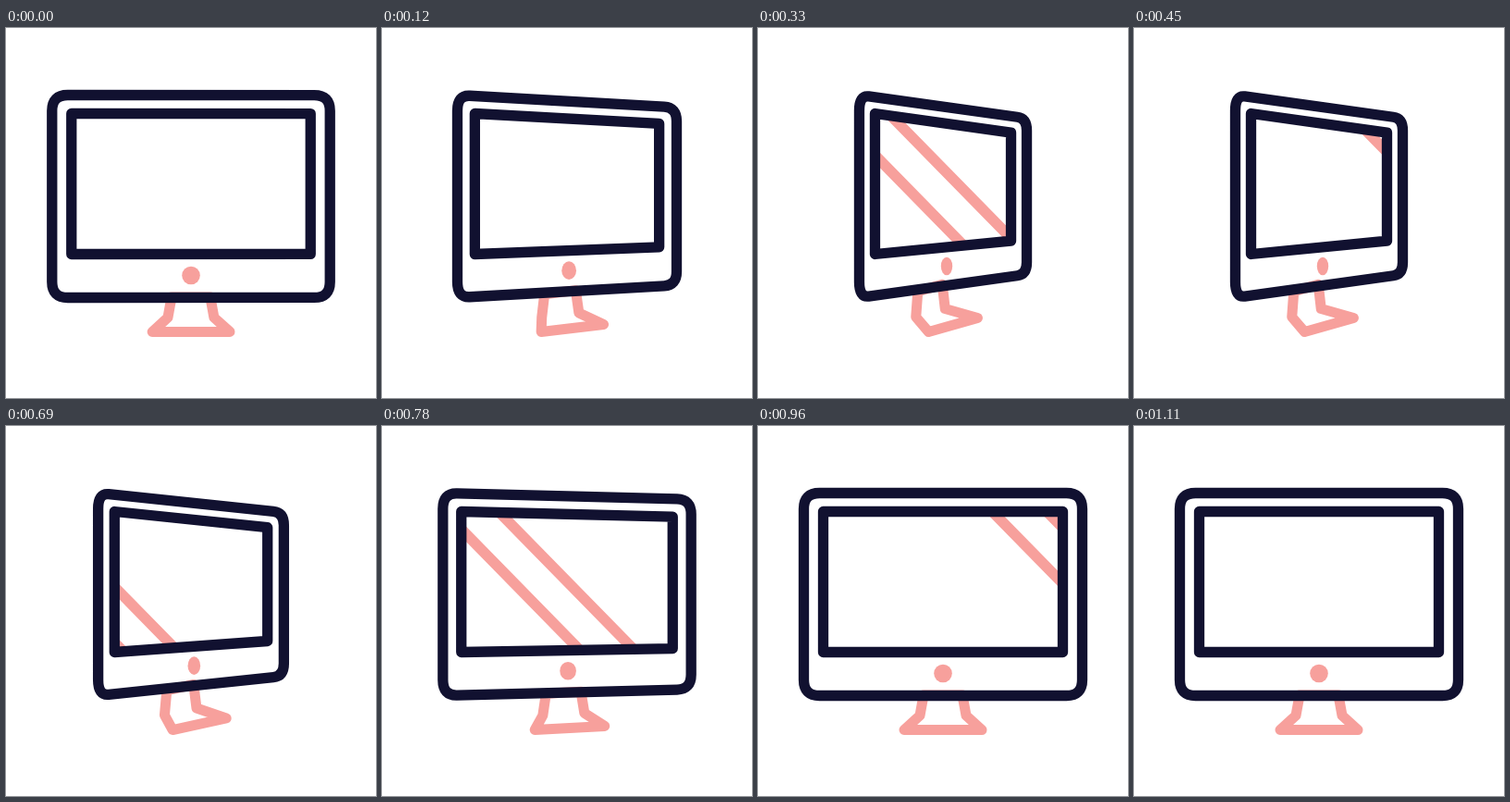
Animation of 400x400 px, one loop 1200 ms. Source, as an HTML page with a canvas:

```html
<!DOCTYPE html>
<html lang="en">
<head>
<meta charset="utf-8">
<title>Turning monitor</title>
<style>
  html, body { margin: 0; width: 100%; height: 100%; overflow: hidden; background: #fff; }
  canvas { display: block; width: 100vw; height: 100vh; }
</style>
</head>
<body>
<canvas id="stage" width="400" height="400"></canvas>
<script>
const ctx = document.getElementById('stage').getContext('2d');
const NAVY = '#111130', PINK = '#f7a09c', LOOP = 1200, CENTER = 200, HORIZON = 182;

const progress = (t, start, length) => Math.min(1, Math.max(0, (t - start) / length));
const smooth = x => x * x * (3 - 2 * x);
const sineOut = x => Math.sin(x * Math.PI / 2);
const cubicInOut = x => x < 0.5 ? 4 * x ** 3 : 1 - 4 * (1 - x) ** 3;

// 0 = facing front, 1 = fully turned
const turnAt = t => sineOut(progress(t, 0, 338)) - cubicInOut(progress(t, 565, 365));

// Offset (x - y) of the trailing glint
const glintAt = t => t < LOOP * 0.45
  ? -236 + 466 * smooth(progress(t, 75, 525))
  : -188 + 418 * smooth(progress(t, 540, 570));

// Rounded box that narrows by `squeeze` per side and shrinks towards its right edge
function box(half, squeeze, top, bottom, radius, s) {
  const path = new Path2D();
  const place = (x, y) => {
    const u = x / half;
    return [CENTER + u * (half - squeeze * s), HORIZON + (y - HORIZON) * (1 - 0.115 * s * (1 + u))];
  };
  for (let i = 0; i < 4; i++) {
    const right = i === 1 || i === 2, low = i > 1;
    const x = right ? half : -half, y = low ? bottom : top;
    const beside = place(x - Math.sign(x) * radius, y);
    const along = place(x, low ? y - radius : y + radius);
    const [from, to] = i % 2 ? [beside, along] : [along, beside];
    path.lineTo(...from);
    path.quadraticCurveTo(...place(x, y), ...to);
  }
  path.closePath();
  return path;
}

// Neck, knee and foot mirrored about the centre; each drifts and lifts while turning
function stand(s) {
  const path = new Path2D();
  const joints = [
    { half: 21, y: 291, drift: -14, lift: 10 },
    { half: 25, y: 313, drift: -13.5, lift: 5 },
    { half: 42, y: 328.5, drift: 11, lift: 7.5 }
  ];
  for (const side of [-1, 1]) {
    for (const { half, y, drift, lift } of joints) {
      const reach = side * half;
      path.lineTo(CENTER + reach * (1 - 0.37 * s) + drift * s, y - (lift + 0.18 * reach) * s);
    }
    joints.reverse();
  }
  path.closePath();
  return path;
}

function stroke(path, color, width) {
  ctx.strokeStyle = color;
  ctx.lineWidth = width;
  ctx.stroke(path);
}

function glints(screen, offset) {
  const path = new Path2D();
  for (const c of [offset, offset + 59]) {
    for (const y of [60, 280]) path[y < HORIZON ? 'moveTo' : 'lineTo'](c + 3.4 + 0.98 * y, y);
  }
  ctx.save();
  ctx.clip(screen);
  stroke(path, PINK, 11.5);
  ctx.restore();
}

function draw(t) {
  const s = turnAt(t), screen = box(129.5, 56, 92.5, 244.5, 0, s);
  ctx.fillStyle = '#fff';
  ctx.fillRect(0, 0, 400, 400);
  ctx.lineJoin = 'round';

  stroke(stand(s), PINK, 11);
  if (t < 1110) glints(screen, glintAt(t));
  stroke(box(150.5, 60, 72.5, 291.5, 17, s), NAVY, 11.3);
  stroke(screen, NAVY, 11.3);

  ctx.fillStyle = PINK;
  ctx.beginPath();
  ctx.ellipse(CENTER + 4 * s, 267.5 - 10 * s, 9.8 - 3.6 * s, 9.8, 0, 0, 2 * Math.PI);
  ctx.fill();
}

function frame() {
  draw(performance.now() % LOOP);
  requestAnimationFrame(frame);
}
frame();
</script>
</body>
</html>
```
